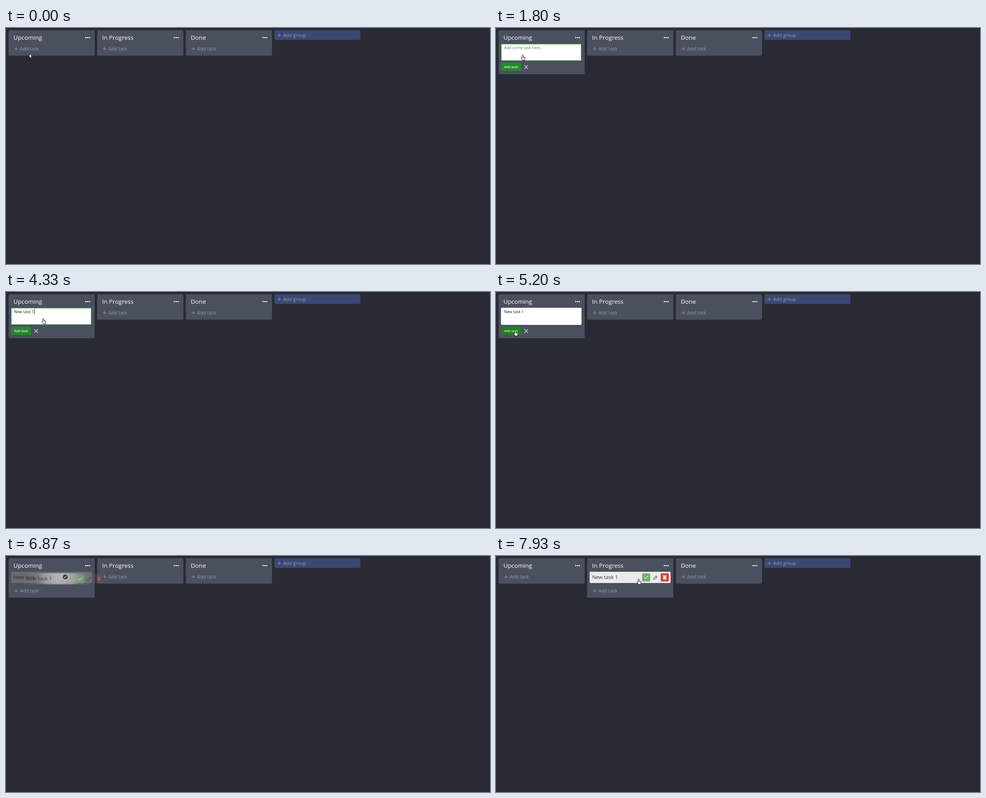
An HTML page with a canvas that plays this animation: 1070 by 524 pixels, repeating every 8000 ms.

```html
<!DOCTYPE html>
<html lang="en">
<head>
<meta charset="utf-8">
<title>Task board</title>
<style>
html, body { margin: 0; width: 100%; height: 100%; overflow: hidden; background: #282b33; }
canvas { display: block; }
</style>
</head>
<body>
<canvas id="stage" width="1070" height="524"></canvas>
<script>
const ctx = document.getElementById('stage').getContext('2d');
const LOOP = 8000, STEP = 200 / 3;
const SANS = '"Open Sans", "Noto Sans", sans-serif';
const ARIAL = '"Liberation Sans", Arial, sans-serif';
const TASK = 'New task 1';
const KEY_TIMES = [2400, 2600, 2730, 2870, 3200, 3330, 3470, 3600, 3730, 3870];

const OPEN = 670, BLUR = 5190, SAVED = 5330, GRAB = 6470, RELEASE = 7330, DROP = 7470;

// Pointer hot spot: time, x, y
const PATH = [
  [330, 51.5, 57], [470, 56, 47], [730, 56, 47], [870, 59, 64], [1000, 59, 64],
  [1130, 59, 59.5], [4270, 59, 59.5], [4400, 104, 58], [4670, 104, 58],
  [5130, 43, 85.5], [5330, 43, 85.5], [5530, 85, 76], [5800, 270, 36],
  [5930, 266, 38], [6330, 103, 44], [6530, 103, 44], [6870, 131, 47],
  [7200, 302, 50], [7470, 302, 49], [7930, 315.5, 51]
];

const HAND = new Path2D('M-1.3 .8Q0-.6 1.2.8V4.6L4.6 5.4Q5.5 5.8 5.3 7L4.5 10.2V12H-.8V10.8L-3.6 7.6Q-4 6.2-2.6 6.2L-1.3 7.2Z');
const ARROW = new Path2D('M0 0V9.4L2.2 7.4L3.8 10.6L5.3 9.9L3.8 6.8H6.7Z');

const within = (t, a, b) => t >= a && t < b;
const clamp = v => Math.max(0, Math.min(1, v));

function pointerAt(t) {
  const i = PATH.findIndex(p => p[0] > t);
  if (i === 0) return PATH[0].slice(1);
  if (i < 0) return PATH[PATH.length - 1].slice(1);
  const [t0, x0, y0] = PATH[i - 1], [t1, x1, y1] = PATH[i];
  let k = (t - t0) / (t1 - t0);
  k = k * k * (3 - 2 * k);
  return [x0 + (x1 - x0) * k, y0 + (y1 - y0) * k];
}

function box(x, y, w, h, color, r = 2) {
  ctx.fillStyle = color;
  ctx.beginPath();
  ctx.roundRect(x, y, w, h, r);
  ctx.fill();
}

function text(s, x, y, size, color, family = SANS) {
  ctx.font = `${size}px ${family}`;
  ctx.fillStyle = color;
  ctx.fillText(s, x, y);
}

function line(color, width, ...points) {
  ctx.strokeStyle = color;
  ctx.lineWidth = width;
  ctx.beginPath();
  for (let i = 0; i < points.length; i += 2) ctx.lineTo(points[i], points[i + 1]);
  ctx.stroke();
}

function addLabel(s, x, y, color) {
  line(color, 1, x, y, x + 8, y);
  line(color, 1, x + 4, y - 4, x + 4, y + 4);
  text(s, x + 12.3, y + 3.5, 10.4, color);
}

function buttons(x, y, alpha = [1, 1, 1]) {
  ctx.globalAlpha = alpha[0];
  box(x + 116, y + 3.5, 18, 18, '#6fb173');
  line('#fff', 1.1, x + 121, y + 12.5, x + 123.7, y + 15.2, x + 129.5, y + 9.5);
  ctx.globalAlpha = alpha[1];
  line('#222', 1, x + 141.3, y + 16.8, x + 142, y + 13.8, x + 147, y + 8.8,
    x + 149.4, y + 11.2, x + 144.4, y + 16.2, x + 141.3, y + 16.8);
  line('#222', 1, x + 145.4, y + 10.4, x + 147.8, y + 12.8);
  ctx.globalAlpha = alpha[2];
  box(x + 157, y + 3.5, 18, 18, '#d64535');
  box(x + 162, y + 8.5, 8, 1.4, '#fff', 0);
  box(x + 164.5, y + 7.6, 3, 1, '#fff', 0);
  box(x + 162.7, y + 10.4, 6.6, 6.6, '#fff', 1);
  ctx.globalAlpha = 1;
}

function card(x, hover, dragged) {
  box(x, 35, 179, 25, dragged ? '#6c6a6e' : hover ? '#ebebeb' : '#fff');
  text(TASK, x + 5.5, 51, 11.25, dragged ? '#2d2e33' : '#333');
  if (hover && !dragged) buttons(x, 35);
}

function ghost(px, py) {
  const x = px - 92, y = py - 9;
  const g = ctx.createRadialGradient(px - 12, py, 0, px - 12, py, 92);
  g.addColorStop(0, 'rgba(225,225,225,.65)');
  g.addColorStop(.35, 'rgba(210,210,210,.5)');
  g.addColorStop(.65, 'rgba(140,140,140,.2)');
  g.addColorStop(1, 'rgba(120,120,120,0)');
  box(x, y, 179, 25, g);
  text(TASK, x + 5.5, y + 16, 11.25, 'rgba(40,40,40,.85)');
  buttons(x, y, [.55, .6, .15]);
}

function form(t, px, py) {
  const focused = t < BLUR;
  box(11, 35, 178, 38, '#fff');
  if (focused) {
    ctx.strokeStyle = '#279a2b';
    ctx.lineWidth = 1.2;
    ctx.strokeRect(11.7, 35.7, 176.6, 36.6);
  }
  const typed = TASK.slice(0, KEY_TIMES.filter(k => t >= k).length);
  text(typed || 'Add some task here...', 17.7, 46.6, 8.6, typed ? '#222' : '#757575');
  const caretOff = within(t, 1800, 2330) || within(t, 4400, 4930);
  if (focused && !caretOff) {
    box(Math.round(18 + ctx.measureText(typed).width * (typed ? 1 : 0)), 37.5, 1, 11.5, '#222', 0);
  }
  const hot = within(px, 11, 55) && within(py, 77, 95);
  box(11, 77, 44, 18, hot ? '#1f7d24' : '#258b2b', 1.5);
  text('Add task', 17.7, 89, 7.9, '#fff', ARIAL);
  line('#d5d7db', 1.2, 62.5, 82.5, 70.7, 91);
  line('#d5d7db', 1.2, 70.7, 82.5, 62.5, 91);
}

function column(i, title, t, px, py) {
  const x = 6 + 196 * i;
  const editing = i === 0 && within(t, OPEN, SAVED);
  const hasCard = i === 0 ? within(t, SAVED, DROP) : i === 1 && t >= DROP;
  const dragging = within(t, GRAB + 60, RELEASE);
  box(x - .4, 5, 190.4, editing ? 97.5 : hasCard ? 87.5 : 56.5, '#4a505e', 3);
  text(title, x + 10.5, 25.6, 13.3, '#fff');
  ctx.fillStyle = '#fff';
  for (let k = 0; k < 3; k++) {
    ctx.beginPath();
    ctx.arc(x + 170.3 + 4 * k, 21.4, 1.35, 0, 7);
    ctx.fill();
  }
  if (editing) return form(t, px, py);
  const over = within(px, x + 5, x + 184);
  if (hasCard) card(x + 5, over && within(py, 35, 60), i === 0 && dragging);
  const rowY = hasCard ? 66 : 35;
  if (over && !dragging && within(py, rowY, rowY + 21.5)) box(x + 5, rowY, 179, 21, '#646980');
  addLabel('Add task', x + 12.3, rowY + 11.3, '#959aa5');
}

function status(t) {
  const spans = [[470, 670], [5400, 6130], [7400, 7600]];
  const alpha = Math.max(...spans.map(([a, b]) => t < a ? 0 : clamp(1 - (t - b) / 270)));
  if (!alpha) return;
  ctx.globalAlpha = alpha;
  box(0, 510, 63, 14, '#fff', [0, 2, 0, 0]);
  text('localhost:3000/#', 4.5, 520.7, 6.75, '#555');
  ctx.globalAlpha = 1;
}

function pointer(t, x, y) {
  ctx.save();
  ctx.translate(x, y);
  ctx.lineJoin = 'round';
  if (within(t, GRAB + 60, RELEASE) && x < 202) {
    for (const [color, width] of [['#ccc', 2.8], ['#000', 1.7]]) {
      ctx.strokeStyle = color;
      ctx.lineWidth = width;
      ctx.beginPath();
      ctx.arc(0, -.5, 4.2, 0, 7);
      ctx.moveTo(-3, -3.5);
      ctx.lineTo(3, 2.5);
      ctx.stroke();
    }
  } else {
    const arrow = t < 400 || within(x, 190, 207) || within(t, GRAB + 60, RELEASE);
    const shape = arrow ? ARROW : HAND;
    ctx.fillStyle = '#fff';
    ctx.strokeStyle = '#111';
    ctx.lineWidth = .9;
    ctx.fill(shape);
    ctx.stroke(shape);
    if (!arrow) {
      line('#111', .6, 1.2, 4.6, 1.2, 7);
      line('#111', .6, 3.1, 5.2, 3.1, 7.2);
    }
  }
  ctx.restore();
}

function draw(now) {
  const t = Math.floor((now % LOOP + 5) / STEP) * STEP + 4;
  const [px, py] = pointerAt(t);
  box(0, 0, 1070, 524, '#282b33', 0);
  ['Upcoming', 'In Progress', 'Done'].forEach((title, i) => column(i, title, t, px, py));
  box(593.3, 5, 190.4, 21.5, '#3a4874', 3);
  addLabel('Add group', 600.4, 16.4, '#959bb0');
  if (within(t, GRAB + 60, RELEASE)) ghost(px, py);
  status(t);
  pointer(t, px, py);
}

const start = performance.now();
function tick() {
  draw(performance.now() - start);
  requestAnimationFrame(tick);
}
tick();
</script>
</body>
</html>
```
